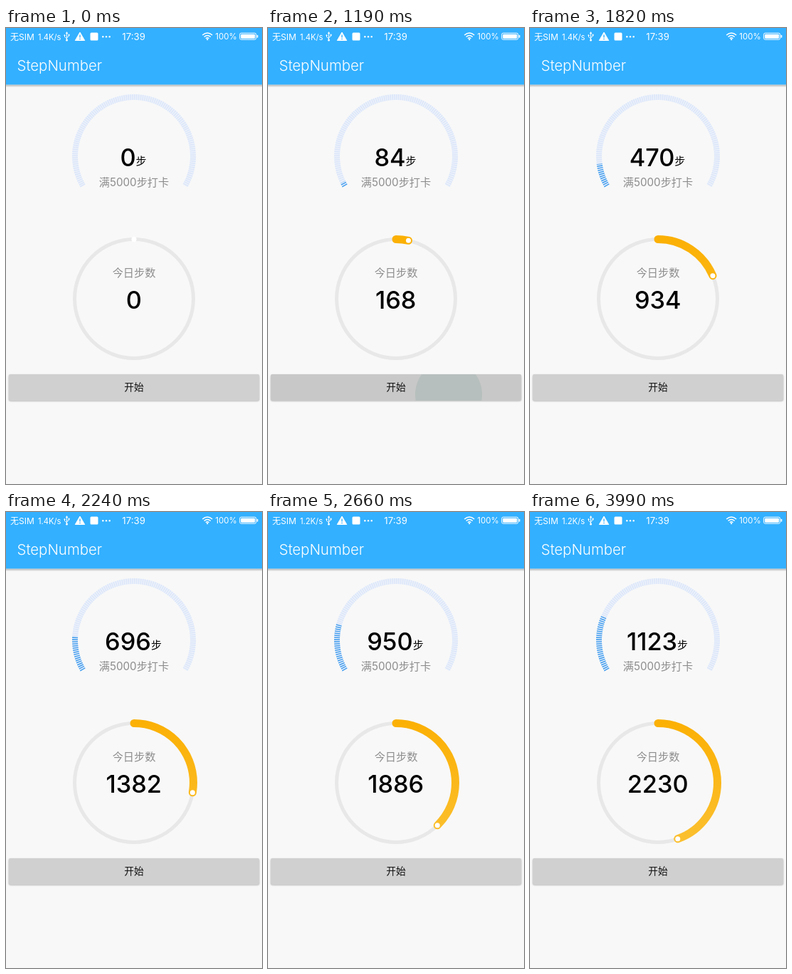
Animation of 360 by 640 pixels, one loop 4060 ms. Source, as an HTML page:

```html
<!DOCTYPE html>
<html lang="zh">
<head>
<meta charset="utf-8">
<title>StepNumber</title>
<style>
  html, body { margin: 0; width: 100%; height: 100%; overflow: hidden; background: #f8f8f8; }
  svg { display: block; width: 360px; height: 640px; }
  text { font-family: Inter, "Noto Sans CJK SC", "Noto Sans CJK", sans-serif; }
  .bar { fill: #fff; }
  .mid { text-anchor: middle; }
  .big { font-size: 34.3px; font-weight: 500; fill: #000; }
  .unit { font-size: 15px; font-weight: 400; }
  .label { font-size: 15.2px; fill: #8d8d8d; }
  .line { fill: none; stroke: #fff; }
  .dial { fill: none; stroke-width: 8; }
  .ticks { stroke-dasharray: 1.5 1.397; }
</style>
</head>
<body>
<svg viewBox="0 0 360 640">
  <defs>
    <linearGradient id="gold" gradientUnits="userSpaceOnUse" x1="0" y1="296" x2="0" y2="464">
      <stop offset="0" stop-color="#fbb004"/>
      <stop offset="1" stop-color="#fbc030"/>
    </linearGradient>
    <linearGradient id="fall" x1="0" y1="0" x2="0" y2="1">
      <stop offset="0" stop-color="#000" stop-opacity=".27"/>
      <stop offset="1" stop-color="#000" stop-opacity="0"/>
    </linearGradient>
    <filter id="soft" x="-5%" y="-20%" width="110%" height="150%"><feGaussianBlur stdDeviation="1.2"/></filter>
    <clipPath id="face"><rect x="4" y="486" width="352" height="37" rx="2"/></clipPath>
  </defs>

  <rect width="360" height="640" fill="#f8f8f8"/>
  <rect y="79.500" width="360" height="4" fill="url(#fall)"/>
  <rect width="360" height="79.500" fill="#33b0ff"/>

  <g class="bar">
    <text x="6" y="16.700" font-size="12">无SIM</text>
    <text id="speed" x="45" y="16.700" font-size="11.200"></text>
    <g class="line">
      <path d="M85.5 7V17M82.5 10.5V12.5L85.5 15M88.5 9.5V11.5L85.5 13.5"/>
    </g>
    <path d="M85.5 5L87.3 8H83.7Z"/>
    <circle cx="85.5" cy="17" r="1.5"/>
    <circle cx="82.5" cy="10.3" r="1.1"/>
    <rect x="87.5" y="8.7" width="2" height="2"/>
    <path d="M104 6L110.7 17.5H97.3Z" stroke="#fff" stroke-linejoin="round"/>
    <path d="M104 9.5V13.5M104 14.8V16.2" stroke="#33b0ff" stroke-width="1.4"/>
    <rect x="118.5" y="6.5" width="11" height="11" rx="1.5"/>
    <circle cx="136.3" cy="12.3" r="1.2"/>
    <circle cx="141" cy="12.3" r="1.2"/>
    <circle cx="145.7" cy="12.3" r="1.2"/>
    <text class="mid" x="179.600" y="17" font-size="13.200">17:39</text>
    <g transform="translate(-.8 -.3)">
      <g class="line" stroke-width="1.5">
        <path d="M277 10.3Q284 4.3 291 10.3M279.4 12.8Q284 8.8 288.6 12.8M281.7 15Q284 13 286.3 15"/>
      </g>
      <circle cx="284" cy="16.5" r="1.1"/>
      <text x="295" y="16.6" font-size="11.5">100%</text>
      <rect class="line" x="329.5" y="7.5" width="23" height="9" rx="2"/>
      <rect x="331" y="9" width="20" height="6" rx="1"/>
      <rect x="353.5" y="10" width="1.7" height="4" rx=".8"/>
    </g>
    <text x="15.5" y="59.800" font-size="20.400" font-weight="300">StepNumber</text>
  </g>

  <path id="base" class="dial" stroke="#edf2fa"/>
  <path id="marks" class="dial ticks" stroke="#dbe6fa"/>
  <path id="done" class="dial ticks" stroke="#459fee"/>
  <text class="mid big" x="179" y="193.700"><tspan id="goal"></tspan><tspan class="unit" dy="-2">步</tspan></text>
  <text class="mid label" x="180" y="221.8">满5000步打卡</text>

  <circle cx="180" cy="380" r="83.5" fill="none" stroke="#e8e8e8" stroke-width="5"/>
  <path id="arc" d="M180 296.5A83.5 83.5 0 0 1 180 463.5A83.5 83.5 0 0 1 180 296.5" pathLength="5000"
        fill="none" stroke="url(#gold)" stroke-width="11" stroke-linecap="round"/>
  <circle id="knob" r="3.5" fill="#fff"/>
  <text class="mid label" x="180" y="349">今日步数</text>
  <text id="today" class="mid big" x="179.700" y="393.700"></text>

  <rect x="4" y="487" width="352" height="36.500" rx="2" fill="#000" opacity=".34" filter="url(#soft)"/>
  <g clip-path="url(#face)">
    <rect x="4" y="486" width="352" height="37" fill="#d0d0d0"/>
    <rect id="press" x="4" y="486" width="352" height="37" fill="#000"/>
    <circle id="ripple" cx="254" cy="514" fill="#8ca8a1"/>
  </g>
  <text class="mid" x="180" y="509" font-size="13.7" fill="#111">开始</text>
</svg>
<script>
const LOOP = 4060, STEP = 70, MAX = 5000;
const $ = id => document.getElementById(id);

// [time, value] steps, linear in between
const today = [[1050, 0], [1190, 168], [1820, 934], [2240, 1382], [2660, 1886], [2940, 2230]];
const goal = [[1050, 0], [1190, 84], [1820, 470], [2240, 696], [2660, 950], [2940, 1123]];
const radius = [[980, 18], [1190, 47], [1400, 110]];
const tint = [[910, 0], [1050, .3], [1190, .3], [1400, 0]];
const press = [[910, 0], [1050, .04], [1190, .04], [1400, 0]];

function at(table, t) {
  const i = table.findIndex(k => k[0] > t);
  if (i === 0) return table[0][1];
  if (i < 0) return table[table.length - 1][1];
  const [t0, a] = table[i - 1], [t1, b] = table[i];
  return a + (b - a) * (t - t0) / (t1 - t0);
}

function polar(cy, r, deg) {
  const a = deg * Math.PI / 180;
  return [180 + r * Math.cos(a), cy + r * Math.sin(a)];
}

function dialPath(sweep) {
  const r = 83, from = polar(180, r, 150), to = polar(180, r, 150 + sweep);
  return `M${from}A${r} ${r} 0 ${sweep > 180 ? 1 : 0} 1 ${to}`;
}

function draw(t) {
  const n = Math.round(at(today, t)), g = Math.round(at(goal, t));
  $('speed').textContent = t < 2590 ? '1.4K/s' : '1.2K/s';

  $('goal').textContent = g;
  $('done').setAttribute('d', g ? dialPath(240 * g / MAX) : '');

  $('today').textContent = n;
  $('arc').style.display = n ? '' : 'none';
  $('arc').setAttribute('stroke-dasharray', `${n} ${2 * MAX}`);
  const [x, y] = polar(380, 83.5, 360 * n / MAX - 90);
  $('knob').setAttribute('cx', x);
  $('knob').setAttribute('cy', y);

  $('press').setAttribute('opacity', at(press, t));
  $('ripple').setAttribute('r', at(radius, t));
  $('ripple').setAttribute('opacity', t < 980 ? 0 : at(tint, t));
}

for (const id of ['base', 'marks']) $(id).setAttribute('d', dialPath(240));
const start = performance.now();
function tick() {
  const t = (performance.now() - start) % LOOP;
  draw(Math.floor(t / STEP) * STEP);
  requestAnimationFrame(tick);
}
tick();
</script>
</body>
</html>
```
